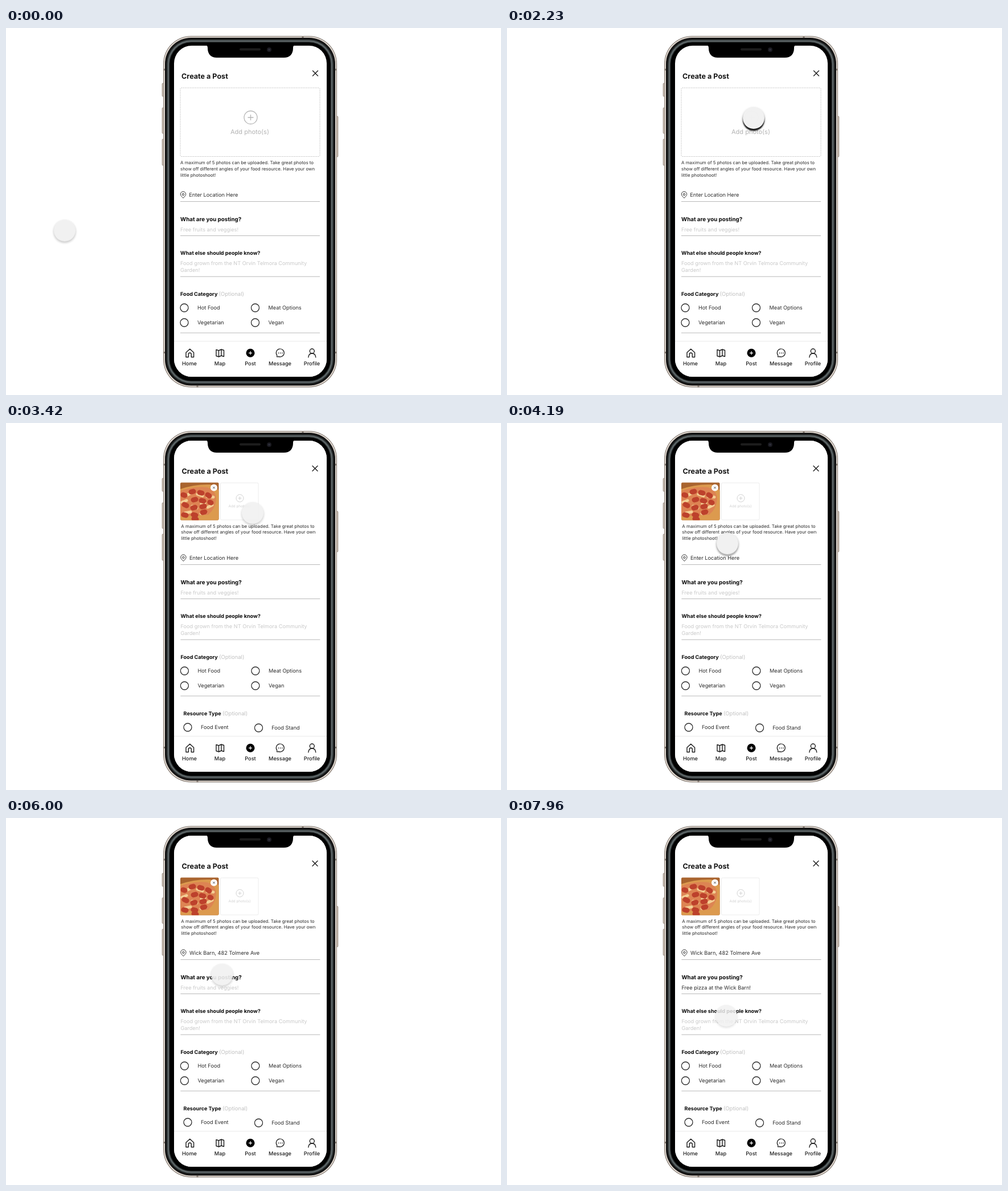
An HTML page that plays this animation: 869x644 px, repeating every 8000 ms.

```html
<!DOCTYPE html>
<html lang="en">
<head>
<meta charset="utf-8">
<title>Create a Post</title>
<style>
  html, body { margin: 0; width: 100%; height: 100%; overflow: hidden; background: #fff; }
  svg { position: absolute; left: 0; top: 0; display: block; }
  text { font: 400 9.2px Inter, "Open Sans", sans-serif; fill: #2c2c2c; text-rendering: geometricPrecision; }
  .title { font-size: 12.6px; font-weight: 650; fill: #161616; }
  .label { font-size: 9.1px; font-weight: 650; fill: #0c0c0c; }
  .big { font-size: 9.8px; }
  .hint { font-size: 7.9px; }
  .soft { fill: #c9c9c9; }
  .opt { font-size: 9.5px; font-weight: 400; fill: #c0c0c0; }
  .mid { text-anchor: middle; }
  .nav text { font-weight: 500; text-anchor: middle; fill: #1c1c1c; }
  .line { fill: none; stroke: #b9b9b9; }
  .ring { fill: none; stroke: #2c2c2c; stroke-width: 1.3; }
  .pin { fill: none; stroke: #333; }
  .icon { fill: none; stroke: #1c1c1c; stroke-width: 1.4; stroke-linejoin: round; stroke-linecap: round; }

  .filled, .in, .out, #tap { animation: 8s linear infinite; }
  .filled { animation-name: dissolve; }
  .place.in { animation-name: placeIn; }
  .place.out { animation-name: placeOut; }
  .food.in { animation-name: foodIn; }
  .food.out { animation-name: foodOut; }
  @keyframes dissolve { 0%, 32.5% { opacity: 0 } 36.5% { opacity: .73 } 38.5% { opacity: .93 } 41%, 100% { opacity: 1 } }
  @keyframes placeIn { 0%, 69.5% { opacity: 0 } 73.5%, 100% { opacity: 1 } }
  @keyframes placeOut { 0%, 69.5% { opacity: 1 } 73.5%, 100% { opacity: 0 } }
  @keyframes foodIn { 0%, 94.5% { opacity: 0 } 98%, 100% { opacity: 1 } }
  @keyframes foodOut { 0%, 94.5% { opacity: 1 } 98%, 100% { opacity: 0 } }

  #tap {
    position: absolute; left: -19px; top: -19px; width: 38px; height: 38px;
    border-radius: 50%; background: #f1f1f1; animation-name: move, press;
  }
  @keyframes move {
    0%, .5% { transform: translate(103px, 355.5px) }
    5% { transform: translate(205px, 337px) }
    10.125% { transform: translate(343px, 291px) }
    12.5% { transform: translate(386px, 241px) }
    14.875% { transform: translate(414px, 200px) }
    17.5% { transform: translate(427px, 176px) }
    20.625% { transform: translate(433px, 163px) }
    24%, 44.25% { transform: translate(433px, 158px) }
    48.5% { transform: translate(411px, 184px) }
    52.375% { transform: translate(387px, 211.5px) }
    54% { transform: translate(382px, 221px) }
    59% { transform: translate(376px, 236px) }
    63%, 69.75% { transform: translate(375px, 239px) }
    74.5% { transform: translate(379px, 272px) }
    79.5% { transform: translate(383px, 299px) }
    83%, 91.3% { transform: translate(383px, 302px) }
    94.75% { transform: translate(383px, 312px) }
    99.5%, 100% { transform: translate(385px, 347px) }
  }
  @keyframes press {
    0%, 4% { opacity: .95; box-shadow: 0 2px 4px rgba(0,0,0,.28), 0 3.5px 2px rgba(0,0,0,0) }
    14.875%, 21% { opacity: .87; box-shadow: 0 2px 4px rgba(0,0,0,.18), 0 3.5px 2px rgba(0,0,0,0) }
    28%, 32% { opacity: 1; box-shadow: 0 2px 4px rgba(0,0,0,.3), 0 3.5px 2px rgba(0,0,0,.9) }
    36.5% { opacity: .83; box-shadow: 0 2px 4px rgba(0,0,0,.35), 0 3.5px 2px rgba(0,0,0,.06) }
    44% { opacity: .88; box-shadow: 0 2px 4px rgba(0,0,0,.25), 0 3.5px 2px rgba(0,0,0,0) }
    52.375% { opacity: .98; box-shadow: 0 2px 4px rgba(0,0,0,.4), 0 3.5px 2px rgba(0,0,0,.12) }
    60% { opacity: 1; box-shadow: 0 2px 4px rgba(0,0,0,.4), 0 3.5px 2px rgba(0,0,0,.45) }
    65%, 68% { opacity: 1; box-shadow: 0 2px 4px rgba(0,0,0,.3), 0 3.5px 2px rgba(0,0,0,.95) }
    74%, 78% { opacity: .9; box-shadow: 0 2px 4px rgba(0,0,0,.25), 0 3.5px 2px rgba(0,0,0,0) }
    83.125% { opacity: 1; box-shadow: 0 2px 4px rgba(0,0,0,.4), 0 3.5px 2px rgba(0,0,0,.32) }
    87%, 91% { opacity: 1; box-shadow: 0 2px 4px rgba(0,0,0,.3), 0 3.5px 2px rgba(0,0,0,.9) }
    97%, 100% { opacity: .83; box-shadow: 0 2px 4px rgba(0,0,0,.16), 0 3.5px 2px rgba(0,0,0,0) }
  }
</style>
</head>
<body>
<svg width="869" height="644" viewBox="0 0 869 644">
  <defs>
    <linearGradient id="metal" x2="0" y2="1">
      <stop stop-color="#7c746d"/><stop offset=".5" stop-color="#95897e"/><stop offset="1" stop-color="#776d64"/>
    </linearGradient>
    <clipPath id="screen"><rect x="295" y="31" width="268" height="581" rx="31"/></clipPath>
    <clipPath id="thumb"><rect x="306" y="104.5" width="67.5" height="66" rx="2"/></clipPath>

    <g id="hint">
      <text class="hint" x="306" y="239.3">A maximum of 5 photos can be uploaded. Take great photos to</text>
      <text class="hint" x="306" y="249.9">show off different angles of your food resource. Have your own</text>
      <text class="hint" x="306" y="260.6">little photoshoot!</text>
    </g>

    <path id="close" class="icon" d="M538.5 75l9 9m0-9l-9 9"/>

    <g id="form">
      <path class="line" d="M306 304.5h245M306 364.5h245M306 436.2h245M306 535h245"/>
      <path class="pin" d="M311 298.5c-3-3.2-4.7-4.7-4.7-6.8a4.7 4.7 0 0 1 9.4 0c0 2.1-1.7 3.6-4.7 6.8z"/>
      <circle class="pin" cx="311" cy="292" r="1.7"/>
      <text class="label big" x="306" y="338.7">What are you posting?</text>
      <text class="label" x="306" y="398">What else should people know?</text>
      <text class="soft" x="306" y="416.3">Food grown from the NT Orvin Telmora Community</text>
      <text class="soft" x="306" y="428.3">Garden!</text>
      <text class="label" x="306" y="469.7">Food Category <tspan class="opt">(Optional)</tspan></text>
      <circle class="ring" cx="313" cy="491" r="7"/>
      <circle class="ring" cx="437.5" cy="491" r="7"/>
      <circle class="ring" cx="313" cy="517" r="7"/>
      <circle class="ring" cx="437.5" cy="517" r="7"/>
      <text x="336" y="494.4">Hot Food</text>
      <text x="460.5" y="494.4">Meat Options</text>
      <text x="336" y="520.4">Vegetarian</text>
      <text x="460.5" y="520.4">Vegan</text>
    </g>
  </defs>

  <!-- phone body -->
  <g fill="#d3c6ba" stroke="#84786d" stroke-width=".8">
    <rect x="274.2" y="97" width="4" height="23" rx="1.2"/>
    <rect x="274.2" y="140" width="4" height="45" rx="1.2"/>
    <rect x="274.2" y="195" width="4" height="46" rx="1.2"/>
    <rect x="579" y="155" width="3.8" height="71" rx="1.2"/>
  </g>
  <rect x="276" y="14" width="305" height="616.5" rx="49" fill="url(#metal)"/>
  <rect x="277" y="15" width="303" height="614.5" rx="48" fill="#e6ddd5"/>
  <path d="M276 73h4M577 73h4M276 569.5h4M577 569.5h4M521 14v3M336 627.5v3" stroke="#8b8178" stroke-width="3"/>
  <rect x="279" y="17" width="299" height="610.5" rx="46" fill="#151515"/>
  <rect x="282.5" y="20.5" width="292" height="603.5" rx="42.5" fill="#3c4446"/>
  <rect x="284.2" y="22.2" width="288.6" height="600.1" rx="40.8" fill="#656d6e"/>
  <rect x="286" y="24" width="285" height="596.5" rx="39" fill="#2a2f30"/>
  <rect x="287.5" y="25.5" width="282" height="593.5" rx="37.5" fill="#000"/>

  <g clip-path="url(#screen)">
    <rect x="295" y="31" width="268" height="581" fill="#fff"/>

    <!-- empty form -->
    <text class="title" x="308" y="88.5">Create a Post</text>
    <use href="#close"/>
    <rect class="line" x="306" y="105" width="245" height="120.5" rx="2" stroke-dasharray="1.5 1.5"/>
    <g fill="none" stroke="#b5b5b5" stroke-width="1.3">
      <circle cx="429.5" cy="157" r="11.5"/><path d="M424.5 157h10m-5-5v10"/>
    </g>
    <text class="mid" x="428" y="186" style="font-size:11px;fill:#b3b3b3">Add photo(s)</text>
    <use href="#hint"/>
    <use href="#form"/>
    <text x="321.3" y="296.3">Enter Location Here</text>
    <text class="soft" x="306" y="356.5">Free fruits and veggies!</text>

    <!-- form with a photo -->
    <g class="filled">
      <rect x="295" y="31" width="268" height="519" fill="#fff"/>
      <text class="title" x="308.4" y="88.5">Create a Post</text>
      <use href="#close" x="-.5" y=".3"/>
      <g clip-path="url(#thumb)" stroke-linecap="round">
        <rect x="306" y="104" width="68" height="67" fill="#a9642f"/>
        <path d="M306 116q26-9 52-8q12 3 16 12v51h-68z" fill="#dc9a4e"/>
        <path d="M306 119q26-9 48-6q14 5 15 20q-1 17-14 28l-49 3z" fill="#dd8453"/>
        <path d="M309 139l8-3m10 10l8 3m1-24l9 3m-31 30l10-2m30-8l8-4m-9-15l11 1m-45-4l6-3m17 36l9-2m-8-15l6-2" stroke="#f3cf94" stroke-width="5"/>
        <path d="M311 126l3 1m11-6l4-1m11 2l4 1m10 3l3 2m-28 7l4-1m10 2l4 1m11 2l2 1m-47 3l4 2m11 4l4-1m12-1l4-1m-36 15l4 1m13-1l4 1m12-5l4-1m-19 12l4 1" stroke="#bd412c" stroke-width="9"/>
      </g>
      <circle cx="365" cy="113.5" r="6" fill="#fff"/>
      <path d="M363.3 111.8l3.4 3.4m0-3.4l-3.4 3.4" stroke="#555"/>
      <rect x="376.5" y="105" width="66.5" height="65" rx="2" fill="none" stroke="#ececec"/>
      <g fill="none" stroke="#d2d2d2">
        <circle cx="410.5" cy="132" r="6.5"/><path d="M407.5 132h6m-3-3v6"/>
      </g>
      <text class="mid" x="410" y="148.3" style="font-size:6.3px;fill:#d0d0d0">Add photo(s)</text>
      <use href="#hint" x="1.3" y="-55.5"/>
      <use href="#form" x=".4" y="-56"/>
      <text class="place out" x="322" y="240.3">Enter Location Here</text>
      <text class="place in" x="322" y="240.3">Wick Barn, 482 Tolmere Ave</text>
      <text class="food out soft" x="306.4" y="300.5">Free fruits and veggies!</text>
      <text class="food in" x="306.4" y="300.5">Free pizza at the Wick Barn!</text>
      <text class="label" x="311.6" y="512.7">Resource Type <tspan class="opt">(Optional)</tspan></text>
      <circle class="ring" cx="319" cy="534" r="7"/>
      <circle class="ring" cx="443.5" cy="535" r="7"/>
      <text x="342" y="537.4">Food Event</text>
      <text x="466.3" y="538.4">Food Stand</text>
    </g>

    <!-- tab bar -->
    <g class="nav">
      <rect x="295" y="549.5" width="268" height="63" fill="#fff"/>
      <path d="M295 549.7h268" stroke="#e9e9e9"/>
      <path class="icon" d="M316 569.5l6.8-6.3l6.8 6.3v8h-4.3v-5a2.5 2.5 0 0 0-5 0v5H316z"/>
      <path class="icon" d="M369 564.5l4.5 1.5l4.5-2l4.5 1.5v11l-4.5-1.5l-4.5 2l-4.5-1.5zM373.5 566v11M378 564v11"/>
      <circle cx="429" cy="570.3" r="7.5" fill="#000"/>
      <path d="M426 570.3h6m-3-3v6" stroke="#fff" stroke-width="1.3"/>
      <path class="icon" style="stroke-width:1.2" d="M475.5 577l.3-2.6a7 7 0 1 1 3 2.2z"/>
      <path class="icon" style="stroke-width:1.7" d="M478.5 570.3h0m3.2 0h0m3.2 0h0"/>
      <circle class="icon" cx="537.3" cy="567" r="4"/>
      <path class="icon" d="M530.8 577.8c.5-4.5 3-6.8 6.5-6.8s6 2.3 6.5 6.8"/>
      <text x="322" y="591.7">Home</text>
      <text x="375.5" y="591.7">Map</text>
      <text x="429" y="591.7">Post</text>
      <text x="481" y="591.7">Message</text>
      <text x="537" y="591.7">Profile</text>
    </g>
  </g>

  <!-- notch -->
  <path d="M349 30c4 0 5 2 5 5c0 11 6 17 16 17h118c10 0 16-6 16-17c0-3 1-5 5-5z"/>
  <rect x="410" y="35.5" width="37" height="4" rx="2" fill="#1d1d1d"/>
  <circle cx="462" cy="38" r="4" fill="#1a1a20"/>
  <circle cx="462" cy="38" r="1.8" fill="#30313c"/>
</svg>
<div id="tap"></div>
</body>
</html>
```
